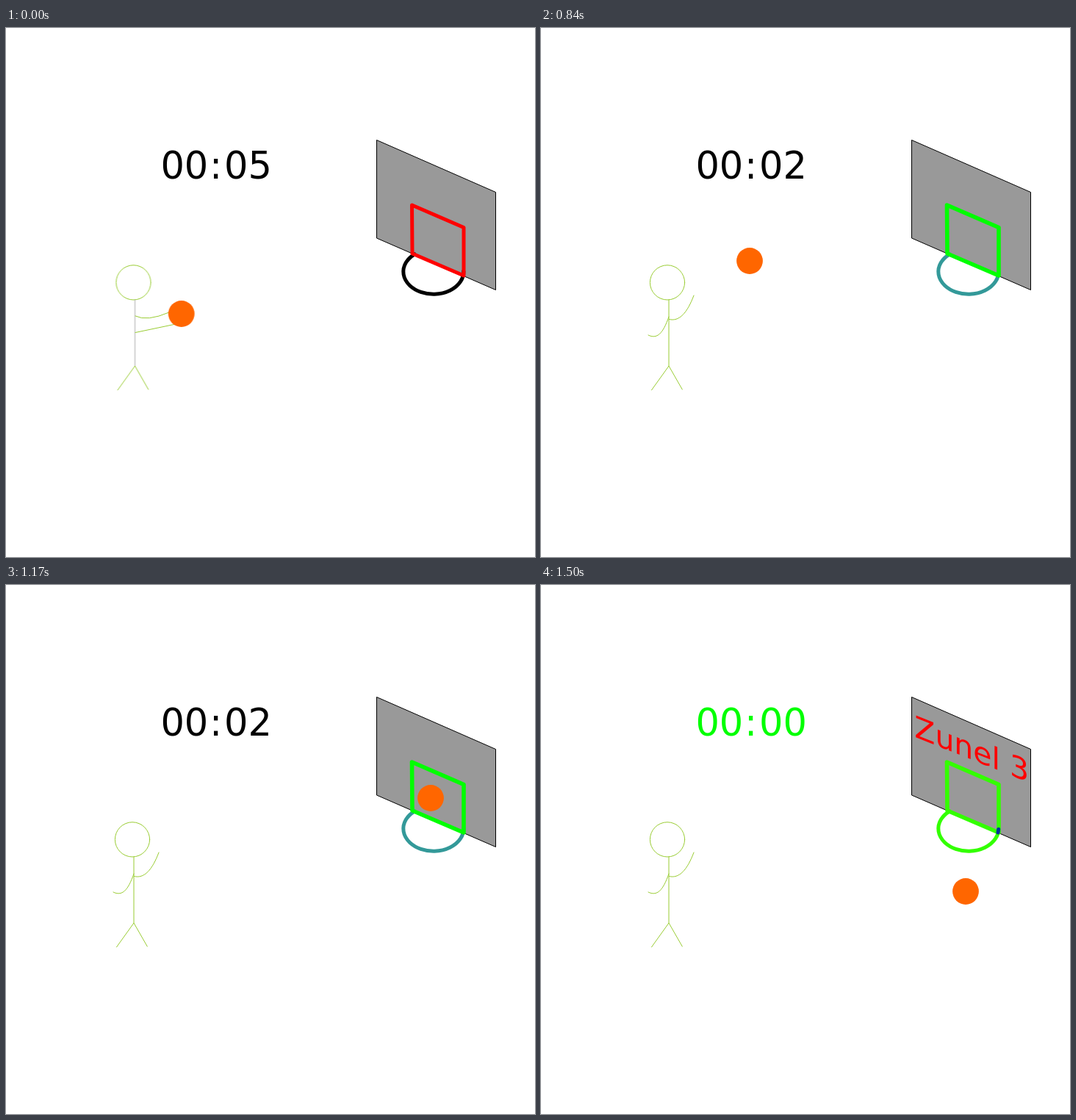
Animation of 720 by 720 pixels, one loop 1.77 s. Source, as an HTML page:

```html
<!DOCTYPE html>
<html lang="en">
<head>
<meta charset="utf-8">
<title>Basketball shot</title>
<style>
html, body { margin: 0; width: 100%; height: 100%; overflow: hidden; background: #fff; }
svg { display: block; width: 100vw; height: 100vh; }
text { font-family: "DejaVu Sans", Verdana, sans-serif; }
.line { fill: none; stroke-linecap: round; stroke-linejoin: round; }
.clock { font-size: 51px; }
.score { font-size: 41px; fill: #f00; }

/* every part holds its pose, then jumps */
.ball, .hoop, .rim, .clock, .man, .spine, .pose {
  animation: 1770ms step-end infinite;
}
.pose { visibility: hidden; }

.ball { animation-name: ball; }
@keyframes ball {
  0% { transform: translate(238.7px, 389px); }
  13.55% { transform: translate(219.8px, 349.8px); }
  32.2% { transform: translate(259px, 332px); }
  47.45% { transform: translate(284px, 317px); }
  54.23% { transform: translate(382px, 284px); }
  61.01% { transform: translate(480px, 281.5px); }
  66.1% { transform: translate(578px, 290px); }
  77.96% { transform: translate(578px, 341px); }
  83.05% { transform: translate(578px, 379px); }
  84.74%, 100% { transform: translate(578px, 417px); }
}

.hoop { animation-name: hoop; }
@keyframes hoop {
  0% { stroke: #f00; stroke-width: 5px; }
  13.55% { stroke: #6f0; stroke-width: 5px; }
  32.2% { stroke: #c06; stroke-width: 5px; }
  47.45% { stroke: #0f0; stroke-width: 5.6px; }
  77.96%, 100% { stroke: #3f0; stroke-width: 5.6px; }
}

.rim { animation-name: rim; }
@keyframes rim {
  0% { stroke: #000; }
  13.55% { stroke: #00f; }
  32.2% { stroke: #900; }
  47.45% { stroke: #399; }
  77.96%, 100% { stroke: #3f0; }
}

.clock { animation-name: clock; }
@keyframes clock {
  0% { fill: #000; }
  84.74%, 100% { fill: #0f0; }
}

.man { animation-name: man; }
@keyframes man {
  0% { transform: translate(1.5px, 0); }
  13.55% { transform: translate(1.5px, -8.8px); }
  32.2% { transform: translate(0, -8.8px); }
  47.45%, 100% { transform: none; }
}

.spine { animation-name: spine; }
@keyframes spine {
  0% { stroke: #aaa; }
  13.55%, 100% { stroke: #9c3; }
}

/* one-beat visibility */
.b5 { animation-name: b5; }
.b4 { animation-name: b4; }
.b3 { animation-name: b3; }
.b2 { animation-name: b2; }
.b1 { animation-name: b1; }
.b0 { animation-name: b0; }
.held { animation-name: held; }
.thrown { animation-name: thrown; }
@keyframes b5 { 0% { visibility: visible; } 13.55%, 100% { visibility: hidden; } }
@keyframes b4 { 13.55% { visibility: visible; } 32.2%, 100% { visibility: hidden; } }
@keyframes b3 { 32.2% { visibility: visible; } 47.45%, 100% { visibility: hidden; } }
@keyframes b2 { 47.45% { visibility: visible; } 77.96%, 100% { visibility: hidden; } }
@keyframes b1 { 77.96% { visibility: visible; } 84.74%, 100% { visibility: hidden; } }
@keyframes b0 { 84.74%, 100% { visibility: visible; } }
@keyframes held { 13.55% { visibility: visible; } 47.45%, 100% { visibility: hidden; } }
@keyframes thrown { 47.45%, 100% { visibility: visible; } }
</style>
</head>
<body>
<svg viewBox="0 0 720 720">
  <defs>
    <path id="arc" d="M556 308A41 30.5 0 1 0 622.8 331"/>
  </defs>

  <path d="M504.5 152.5L666.5 223.5V356.5L504.5 286Z" fill="#999" stroke="#000"/>
  <g class="pose b0">
    <text class="score" transform="matrix(1 .4 0 1 508.3 206.5)">Zunel 3</text>
  </g>
  <g class="line" stroke-width="5">
    <use class="rim" href="#arc"/>
    <path class="hoop" d="M552.5 241L623 271.5V337L553 307Z"/>
    <g class="pose held"><use class="rim" href="#arc"/></g>
    <path class="pose b0" stroke="#039" d="M622.7 332.5L622 337"/>
  </g>

  <g class="clock">
    <text x="210.4 242.8 276.9 297" y="205">00:0</text>
    <g>
      <text class="pose b5" x="329.4" y="205">5</text>
      <text class="pose b4" x="329.4" y="205">4</text>
      <text class="pose b3" x="329.4" y="205">3</text>
      <text class="pose b2" x="329.4" y="205">2</text>
      <text class="pose b1" x="329.4" y="205">1</text>
      <text class="pose b0" x="329.4" y="205">0</text>
    </g>
  </g>

  <g class="line" stroke="#9c3">
    <g class="man">
      <circle cx="172" cy="346.4" r="23.6"/>
      <path class="spine" d="M174 370V460"/>
      <path d="M150.5 492.8L174 460L192.3 492"/>
    </g>
    <path class="pose b5" d="M176 392Q192 400 222 387M176 414.5L231 403"/>
    <path class="pose b4" d="M176 383.5C188 388 196 378 204 357M176 396C190 399 200 388 210 362"/>
    <path class="pose b3" d="M174 383.5C186 388 193 378 201 359L211 348M174.5 396C188 400 199 388 208 364"/>
    <path class="pose thrown" d="M146 418C158 424 166 416 174 393M174.5 396.5C188 400 199 388 208 364"/>
  </g>

  <circle class="ball" r="17.9" fill="#f60"/>
</svg>
</body>
</html>
```
